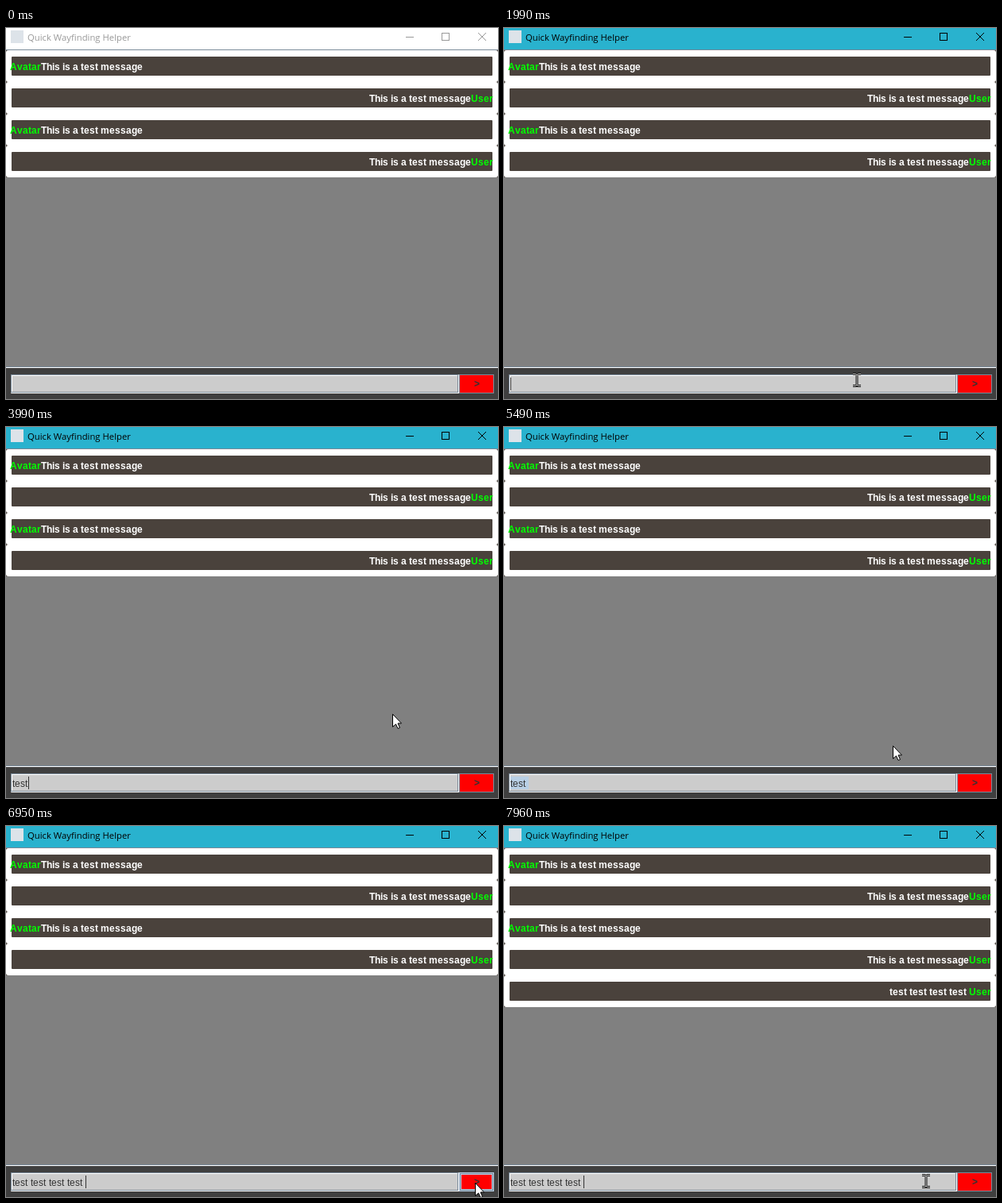
Animation, 619 px wide and 467 px high, one loop 8000 ms. Source, as an HTML page with a canvas:

```html
<!DOCTYPE html>
<html lang="en">
<head>
<meta charset="utf-8">
<style>
  html, body { margin: 0; overflow: hidden; }
  canvas { display: block; }
</style>
</head>
<body>
<canvas id="stage" width="619" height="467"></canvas>
<script>
const g = document.getElementById('stage').getContext('2d');

const LOOP = 8000, FOCUS = 580, SPACE = 4500, SELECT = 4870;
const PRESS = 7140, SENT = 7190, REFOCUS = 7770;
const TYPING = { start: 3750, gap: 80, count: 4 };
const PASTING = { start: 6000, gap: 204, count: 4 };
const BLINK = 508, LETTER = 5, WORD = 23;

const BOLD = 'bold 12px "Liberation Sans", Arial, sans-serif';
const PLAIN = '12px "Liberation Sans", Arial, sans-serif';
const TITLE = '11.3px "Open Sans", sans-serif';
const BROWN = '#4a423c', EDGE = '#7a8a99', BLUE = '#b8cfe5', INK = '#333';

// Each move eases the pointer from where it rests to x, y
const MOVES = [
  { from: 290, to: 560, x: 508, y: 236 },
  { from: 710, to: 1080, x: 502, y: 144 },
  { from: 1420, to: 1990, x: 444, y: 443 },
  { from: 2000, to: 2350, x: 515, y: 446 },
  { from: 2350, to: 2860, x: 486, y: 361 },
  { from: 5250, to: 5640, x: 490, y: 421 },
  { from: 5830, to: 6400, x: 474, y: 448 },
  { from: 6420, to: 7000, x: 592, y: 449 },
  { from: 7320, to: 7720, x: 504, y: 447 },
  { from: 7870, to: 7960, x: 531, y: 447 }
];

const clamp = (value, min, max) => Math.min(max, Math.max(min, value));
const ease = k => k * k * (3 - 2 * k);

function stepsDone({ start, gap, count }, t) {
  return clamp(Math.floor((t - start) / gap) + 1, 0, count);
}

function rect(x, y, w, h, color) {
  g.fillStyle = color;
  g.fillRect(x, y, w, h);
}

function frame(x, y, w, h, color) {
  g.strokeStyle = color;
  g.lineWidth = 1;
  g.strokeRect(x + .5, y + .5, w - 1, h - 1);
}

function roundRect(x, y, w, h, radius, color) {
  g.fillStyle = color;
  g.beginPath();
  g.roundRect(x, y, w, h, radius);
  g.fill();
}

// Interface text advances by whole pixels per character
const advance = char => Math.round(g.measureText(char).width);

function text(value, x, y, color, font) {
  g.font = font;
  g.fillStyle = color;
  for (const char of value) {
    g.fillText(char, x, y);
    x += advance(char);
  }
}

function textBefore(value, right, y, color, font) {
  g.font = font;
  const width = [...value].reduce((sum, char) => sum + advance(char), 0);
  text(value, right - width, y, color, font);
}

function drawTitle(active) {
  const ink = active ? '#000' : '#999';
  rect(0, 0, 619, 27, active ? '#29b2ce' : '#fff');
  rect(0, 27, 619, 1, EDGE);
  rect(6, 3, 16, 16, '#dde3e9');
  g.font = TITLE;
  g.fillStyle = ink;
  g.fillText('Quick Wayfinding Helper', 27, 16);
  rect(503, 11, 10, 1, ink);
  frame(548, 6, 10, 10, ink);
  g.beginPath();
  g.moveTo(594, 6); g.lineTo(604, 16);
  g.moveTo(604, 6); g.lineTo(594, 16);
  g.stroke();
}

function drawMessage(row, message, fromUser) {
  const y = 28 + row * 40, baseline = y + 25;
  rect(0, y, 619, 40, BROWN);
  roundRect(0, y, 619, 40, 3, '#fff');
  roundRect(7, y + 8, 605, 24, 1, BROWN);
  if (fromUser) {
    text('User', 585, baseline, '#0f0', BOLD);
    textBefore(message, 585, baseline, '#fff', BOLD);
  } else {
    textBefore('Avatar', 44, baseline, '#0f0', BOLD);
    text(message, 44, baseline, '#fff', BOLD);
  }
}

function caretVisible(t) {
  if (t < FOCUS || (t >= PRESS && t < REFOCUS)) return false;
  const lastStep = steps => steps.start + steps.gap * (stepsDone(steps, t) - 1);
  const events = [FOCUS, lastStep(TYPING), SPACE, SELECT, lastStep(PASTING), REFOCUS];
  const reset = Math.max(...events.filter(time => time <= t && time >= FOCUS &&
    (time < TYPING.start || t >= TYPING.start) && (time < PASTING.start || t >= PASTING.start)));
  return (t - reset) % (2 * BLINK) < BLINK;
}

function drawField(t) {
  rect(6, 436, 564, 24, '#ccc');
  frame(7, 437, 563, 23, '#fff');
  frame(6, 436, 563, 23, EDGE);

  const typed = stepsDone(TYPING, t), pasted = stepsDone(PASTING, t);
  if (t >= SELECT && !pasted) rect(8, 440, WORD, 16, BLUE);
  for (let i = 0; i < Math.max(pasted, 1); i++) {
    text('test'.slice(0, typed), 8 + i * WORD, 453, INK, PLAIN);
  }

  if (caretVisible(t)) {
    const offset = pasted ? pasted * WORD : t >= SPACE ? WORD : typed * LETTER;
    rect(8 + offset, 440, 1, 16, INK);
  }
}

function drawButton(hover, focused) {
  rect(570, 436, 44, 24, '#f00');
  if (hover) {
    frame(570, 436, 44, 24, BLUE);
    frame(571, 437, 42, 22, EDGE);
    frame(572, 438, 40, 20, BLUE);
  } else {
    frame(570, 436, 44, 24, EDGE);
  }
  text('>', 589, 452, INK, BOLD);
  if (focused) frame(588, 439, 9, 18, '#a3b8cc');
}

function pointerAt(t) {
  let x = 618, y = 262;
  for (const move of MOVES) {
    const k = ease(clamp((t - move.from) / (move.to - move.from), 0, 1));
    x += (move.x - x) * k;
    y += (move.y - y) * k;
  }
  return { x: Math.round(x), y: Math.round(y) };
}

const arrow = new Path2D('M.5 .5V16.5L4.5 13L7 18.5L9.5 17.5L7 12H11.5Z');
const beam = new Path2D('M-5 -7.5H-2L0 -6.5L2 -7.5H5M0 -6.5V6.5M-5 7.5H-2L0 6.5L2 7.5H5');

function drawPointer({ x, y }, overField) {
  g.save();
  g.translate(x, y);
  if (overField) {
    g.strokeStyle = '#111';
    g.lineWidth = 3;
    g.stroke(beam);
    g.strokeStyle = '#ccc';
    g.lineWidth = 1;
    g.stroke(beam);
  } else {
    g.fillStyle = '#fff';
    g.fill(arrow);
    g.strokeStyle = '#000';
    g.lineWidth = 1;
    g.stroke(arrow);
  }
  g.restore();
}

function draw(t) {
  const pointer = pointerAt(t);
  const onControls = pointer.y >= 436 && pointer.y < 460;

  rect(0, 0, 619, 467, '#808080');
  drawTitle(t >= FOCUS);
  for (let row = 0; row < 4; row++) drawMessage(row, 'This is a test message', row % 2 === 1);
  if (t >= SENT) drawMessage(4, 'test test test test ', true);

  rect(0, 426, 619, 1, EDGE);
  rect(0, 427, 619, 1, '#fff');
  rect(0, 428, 619, 39, '#3f3f3f');
  drawField(t);
  drawButton(onControls && pointer.x >= 570, t >= PRESS && t < REFOCUS);
  if (t >= MOVES[0].from) drawPointer(pointer, onControls && pointer.x < 570);
}

function tick() {
  draw(performance.now() % LOOP);
  requestAnimationFrame(tick);
}
tick();
</script>
</body>
</html>
```
